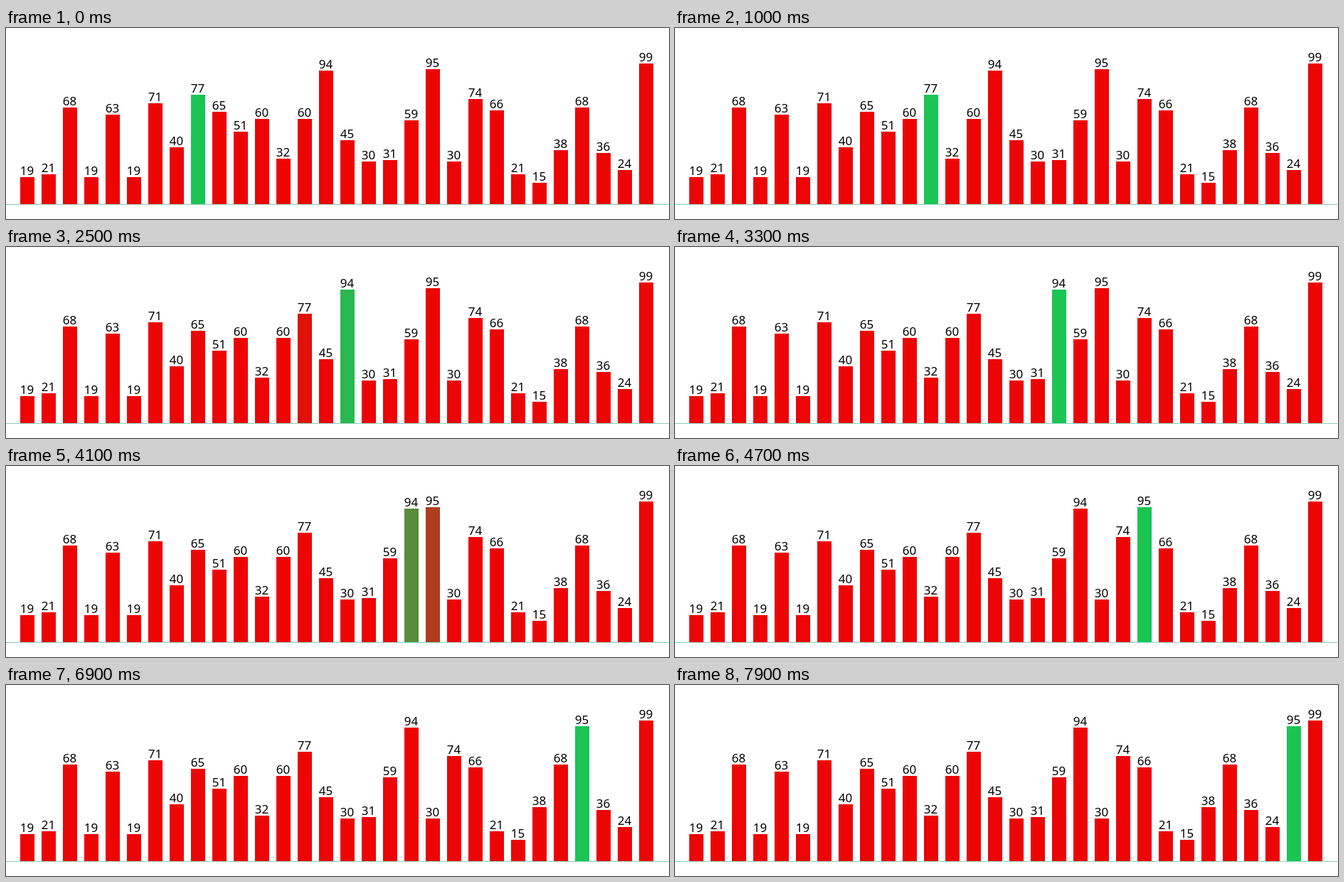
Animation of 932x269 px, one loop 8000 ms. Source, as an HTML page:

```html
<!DOCTYPE html>
<html lang="en">
<head>
<meta charset="utf-8">
<title>Bubble sort</title>
<style>
  html, body { margin: 0; width: 100%; height: 100%; overflow: hidden; background: #fff; }
  svg { display: block; }
  text { font: 17px "Noto Sans", "Open Sans", sans-serif; text-anchor: middle; fill: #000; }
  rect, line { shape-rendering: crispEdges; }
</style>
</head>
<body>
<svg id="stage" width="932" height="269" viewBox="0 0 932 269">
  <line x1="0" y1="248.5" x2="932" y2="248.5" stroke="#0a9f72" stroke-dasharray="1 1"/>
</svg>
<script>
const LOOP = 8000, TICK = 100, BASE = 248;
const RED = [237, 4, 4], GREEN = [27, 197, 84];
const START = [19, 21, 68, 19, 63, 19, 71, 40, 77, 65, 51, 60, 32, 60, 94,
  45, 30, 31, 59, 95, 30, 74, 66, 21, 15, 38, 68, 36, 24, 99];
const SWAPS = [100, 500, 1000, 1400, 1900, 2400, 2800, 3300, 3700, 4300,
  4700, 5100, 5600, 6000, 6500, 6900, 7400, 7900];
const FADE = 500;
const HANDOVERS = [{ at: 2160, from: 77, to: 94 }, { at: 4000, from: 94, to: 95 }];

const stage = document.getElementById("stage");
const add = (tag, attrs) => {
  const el = document.createElementNS("http://www.w3.org/2000/svg", tag);
  for (const key in attrs) el.setAttribute(key, attrs[key]);
  return stage.appendChild(el);
};
const bars = START.map((_, i) => ({
  rect: add("rect", { x: 20 + 30 * i, width: 20 }),
  label: add("text", { x: 29.4 + 30 * i })
}));

// The CSS "ease" curve, cubic-bezier(.25, .1, .25, 1).
function ease(x) {
  if (x <= 0) return 0;
  if (x >= 1) return 1;
  const bezier = (a, b, u) => 3 * a * u * (1 - u) ** 2 + 3 * b * u * u * (1 - u) + u ** 3;
  let lo = 0, hi = 1;
  for (let n = 0; n < 20; n++) {
    const mid = (lo + hi) / 2;
    if (bezier(.25, .25, mid) < x) lo = mid; else hi = mid;
  }
  return bezier(.1, 1, lo);
}

// Carry the larger value to the right, one swap per elapsed time.
function valuesAt(time) {
  const list = START.slice();
  let i = 8;
  for (const at of SWAPS) {
    if (at > time) break;
    while (list[i] < list[i + 1]) i++;
    [list[i], list[i + 1]] = [list[i + 1], list[i]];
    i++;
  }
  return list;
}

function highlightsAt(time) {
  const weight = { 77: 1 };
  for (const { at, from, to } of HANDOVERS) {
    if (time < at) break;
    weight[to] = ease((time - at) / FADE);
    weight[from] = 1 - weight[to];
  }
  return weight;
}

const mix = w => `rgb(${RED.map((c, k) => Math.round(c + (GREEN[k] - c) * w))})`;

function draw(time) {
  const weight = highlightsAt(time);
  valuesAt(time).forEach((value, i) => {
    const { rect, label } = bars[i], top = BASE - 2 * value;
    rect.setAttribute("y", top);
    rect.setAttribute("height", 2 * value);
    rect.setAttribute("fill", mix(weight[value] || 0));
    label.setAttribute("y", top - 3);
    label.textContent = value;
  });
}

const origin = performance.now();
function frame() {
  const time = (performance.now() - origin) % LOOP;
  draw(Math.floor(time / TICK) * TICK);
  requestAnimationFrame(frame);
}
frame();
</script>
</body>
</html>
```
